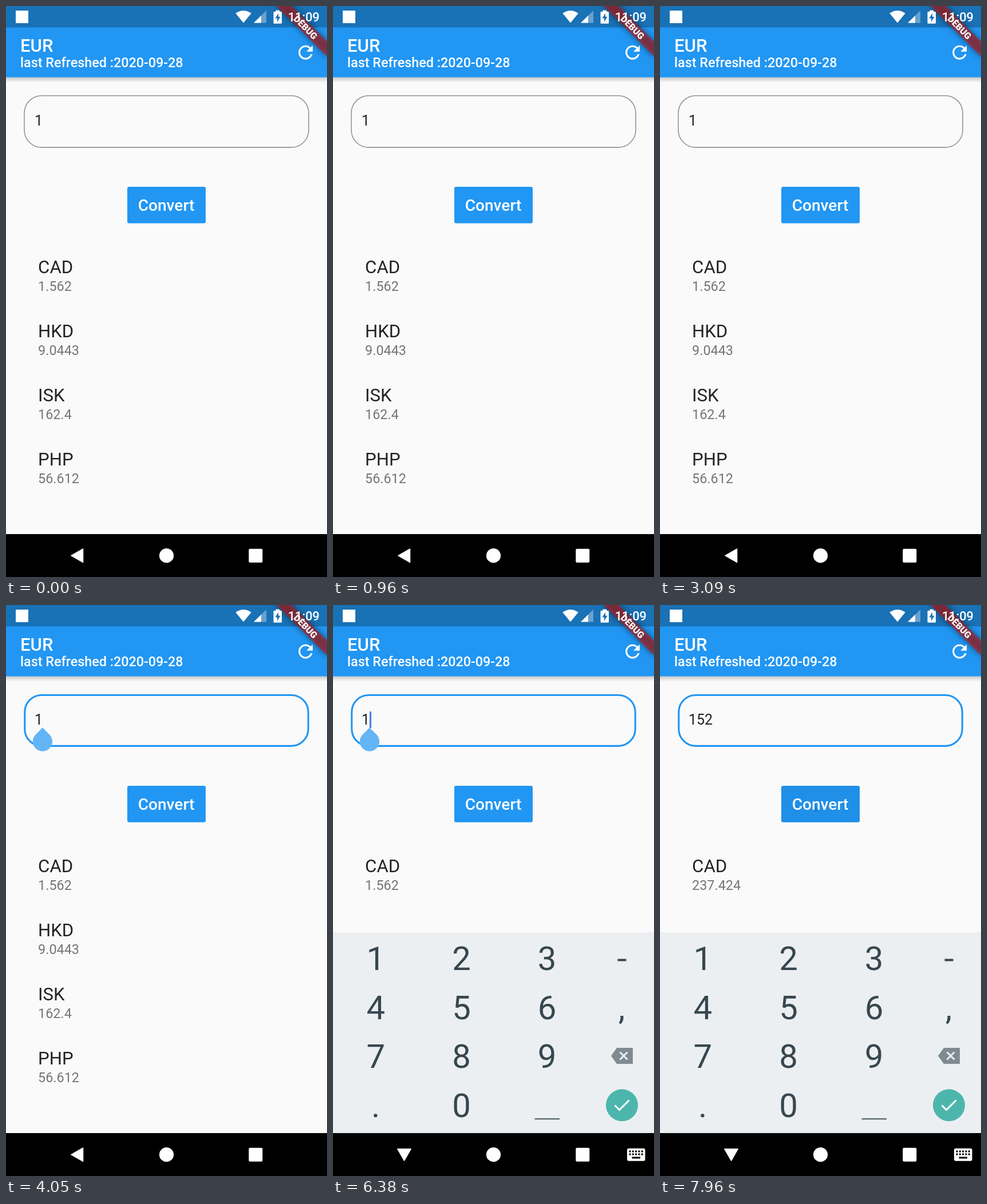
An HTML page with a canvas that plays this animation: 561 by 998 pixels, repeating every 8000 ms.

```html
<!DOCTYPE html>
<html lang="en">
<head>
<meta charset="utf-8">
<title>Currency converter</title>
<style>
  html, body { margin: 0; width: 100%; height: 100%; overflow: hidden; background: #fafafa; }
  canvas { display: block; width: 100vw; height: 100vh; }
</style>
</head>
<body>
<canvas id="stage"></canvas>
<script>
const W = 561, H = 998, LOOP = 8000;
const DP = W / 360;
const BLUE = '#2196f3';
const NAV_Y = 923, KEYS_Y = 575;

// Moments of the interaction, in ms
const FOCUS = 3130, KEYBOARD = 4300, TYPE_5 = 6700, TYPE_2 = 7050, PRESS = 7880, RESULT = 7940;

const RATES = [['CAD', '1.562'], ['HKD', '9.0443'], ['ISK', '162.4'], ['PHP', '56.612']];
const REFRESH = new Path2D('M17.65 6.35C16.2 4.9 14.21 4 12 4c-4.42 0-7.99 3.58-7.99 8s3.57 8 7.99 8c3.73 0 6.84-2.55 7.73-6h-2.08c-.82 2.33-3.04 4-5.65 4-3.31 0-6-2.69-6-6s2.69-6 6-6c1.66 0 3.14.69 4.22 1.78L13 11h7V4l-2.35 2.35z');

const canvas = document.getElementById('stage');
const ctx = canvas.getContext('2d');
const ratio = window.devicePixelRatio || 1;
canvas.width = Math.round(W * ratio);
canvas.height = Math.round(H * ratio);

const progress = (t, start, length) => Math.min(1, Math.max(0, (t - start) / length));
const easeOut = p => 1 - (1 - p) ** 3;

function rect(x, y, w, h, color) {
  ctx.fillStyle = color;
  ctx.fillRect(x, y, w, h);
}

function roundRect(x, y, w, h, r, color) {
  ctx.beginPath();
  ctx.roundRect(x, y, w, h, r);
  ctx.fillStyle = color;
  ctx.fill();
}

function circle(x, y, r, color) {
  ctx.beginPath();
  ctx.arc(x, y, r, 0, Math.PI * 2);
  ctx.fillStyle = color;
  ctx.fill();
}

function trace(points, closed) {
  ctx.beginPath();
  points.forEach(([x, y]) => ctx.lineTo(x, y));
  if (closed) ctx.closePath();
}

function polygon(points, color) {
  trace(points, true);
  ctx.fillStyle = color;
  ctx.fill();
}

function polyline(points, width, color) {
  trace(points, false);
  ctx.lineWidth = width;
  ctx.strokeStyle = color;
  ctx.stroke();
}

function text(str, x, y, size, color, weight = 400, align = 'left') {
  ctx.font = `${weight} ${size}px Roboto, sans-serif`;
  ctx.textAlign = align;
  ctx.fillStyle = color;
  ctx.fillText(str, x, y);
}

function fade(x, y, h, from, to) {
  const g = ctx.createLinearGradient(0, y, 0, y + h);
  g.addColorStop(0, `rgba(0,0,0,${from})`);
  g.addColorStop(1, `rgba(0,0,0,${to})`);
  rect(x, y, W, h, g);
}

function drawAppBar() {
  fade(0, 124.7, 9, 0.2, 0);
  rect(0, 0, W, 124.7, BLUE);
  rect(0, 0, W, 37.4, 'rgba(0,0,0,0.25)');
  text('EUR', 25, 79.5, 20 * DP, '#fff', 500);
  text('last Refreshed :2020-09-28', 25, 107, 15 * DP, '#fff', 500);
  ctx.save();
  ctx.translate(504.9, 62.5);
  ctx.scale(DP, DP);
  ctx.fillStyle = '#fff';
  ctx.fill(REFRESH);
  ctx.restore();
}

function drawBanner() {
  ctx.save();
  ctx.translate(W, 0);
  ctx.rotate(Math.PI / 4);
  const x = -40 * DP, y = 28 * DP, w = 80 * DP, h = 12 * DP;
  // Only the blurred shadow of an off-stage bar lands here
  ctx.save();
  ctx.shadowColor = 'rgba(0,0,0,0.5)';
  ctx.shadowBlur = 12 * ratio;
  const away = 2000;
  ctx.shadowOffsetX = away * Math.SQRT1_2 * ratio;
  ctx.shadowOffsetY = away * Math.SQRT1_2 * ratio;
  rect(x - away, y, w, h, '#000');
  ctx.restore();
  rect(x, y, w, h, 'rgba(183,28,28,0.627)');
  text('DEBUG', 0, y + h / 2 + 5.6, 10.2 * DP, '#fff', 900, 'center');
  ctx.restore();
}

function drawStatusIcons() {
  rect(17, 8, 22, 22, '#fff');

  ctx.beginPath();
  ctx.moveTo(415, 29.5);
  ctx.lineTo(401.3, 12.8);
  ctx.quadraticCurveTo(415, 3, 428.7, 12.8);
  ctx.closePath();
  ctx.fillStyle = '#fff';
  ctx.fill();

  polygon([[433, 29.5], [455, 29.5], [455, 8]], 'rgba(255,255,255,0.35)');
  polygon([[433, 29.5], [446, 29.5], [446, 16.8]], '#fff');

  rect(471.5, 7.5, 6.5, 4, '#fff');
  roundRect(467.5, 9.8, 14.5, 21, 1.5, '#fff');
  polygon([[476, 12.5], [470.5, 21.5], [474, 21.5], [474, 28], [479.5, 18.8], [476, 18.8]], '#1971b6');

  text('11:09', 548, 27, 14 * DP, '#fff', 500, 'right');
}

function drawField(t) {
  const focus = progress(t, FOCUS, 167);
  const line = DP * (1 + focus);
  const mix = (a, b) => Math.round(a + (b - a) * focus);
  ctx.beginPath();
  ctx.roundRect(31.2 + line / 2, 155.9 + line / 2, 498.6 - line, 92 - line, 20 * DP - line / 2);
  ctx.lineWidth = line;
  ctx.strokeStyle = `rgb(${mix(146, 33)},${mix(146, 150)},${mix(146, 243)})`;
  ctx.stroke();

  const value = t < TYPE_5 ? '1' : t < TYPE_2 ? '15' : '152';
  text(value, 49.9, 209, 16 * DP, '#212121');
  if (t < FOCUS) return;

  const blinkStart = t < TYPE_5 ? FOCUS : t < TYPE_2 ? TYPE_5 : TYPE_2;
  const caretX = 49.9 + ctx.measureText(value).width;
  if ((t - blinkStart) % 1000 < 500) roundRect(caretX, 186, 2 * DP, 29, 1, '#4285f4');
  if (t < TYPE_5) drawHandle(caretX);
}

function drawHandle(x) {
  const r = 11 * DP;
  ctx.beginPath();
  ctx.moveTo(x, 238.5 - r * Math.SQRT2);
  ctx.arc(x, 238.5, r, -Math.PI / 4, Math.PI * 1.25);
  ctx.closePath();
  ctx.fillStyle = '#64b5f6';
  ctx.fill();
}

function drawButton(t) {
  roundRect(212, 316, 137, 63.7, 3, BLUE);
  if (t >= PRESS) {
    const p = progress(t, PRESS, 200);
    ctx.save();
    ctx.beginPath();
    ctx.roundRect(212, 316, 137, 63.7, 3);
    ctx.clip();
    rect(212, 316, 137, 64, `rgba(0,0,0,${0.12 * p})`);
    circle(272, 358, 2 + 5 * p, 'rgba(0,0,0,0.1)');
    ctx.restore();
  }
  text('Convert', 280, 358, 18 * DP, '#fff', 500, 'center');
}

function drawRates(t) {
  const rows = t < KEYBOARD ? RATES : RATES.slice(0, 1);
  rows.forEach(([code, rate], i) => {
    const y = 466.8 + i * 72 * DP;
    text(code, 56.1, y, 20 * DP, '#212121');
    text(t < RESULT ? rate : '237.424', 56.1, y + 31, 15 * DP, '#757575');
  });
}

function drawKeyboard(t) {
  const p = easeOut(progress(t, KEYBOARD, 220));
  const ink = '#37474f';
  ctx.save();
  ctx.beginPath();
  ctx.rect(0, 0, W, NAV_Y);
  ctx.clip();
  ctx.translate(0, (1 - p) * (NAV_Y - KEYS_Y));

  fade(0, KEYS_Y - 4, 4, 0, 0.08);
  rect(0, KEYS_Y, W, NAV_Y - KEYS_Y, '#eceff1');
  const columns = [74.7, 224.5, 374];
  const rowY = i => 638 + i * 85.7;
  ['123', '456', '789', '.0'].forEach((row, r) => {
    [...row].forEach((key, c) => text(key, columns[c], rowY(r), 58, ink, 400, 'center'));
  });
  rect(352.5, 897, 43.5, 2.4, '#5f6c73');
  rect(497.5, 618.5, 15, 4, ink);
  text(',', 504.5, rowY(1), 58, ink, 400, 'center');

  polygon([[486, 788], [496, 774], [524, 774], [524, 802], [496, 802]], '#7f8b91');
  polyline([[501.5, 781.5], [514.5, 794.5]], 3, '#eceff1');
  polyline([[514.5, 781.5], [501.5, 794.5]], 3, '#eceff1');

  circle(505, 874.3, 28, '#4db6ac');
  polyline([[492.5, 874.5], [500.5, 882.5], [517.5, 865.5]], 3, '#fff');
  ctx.restore();
}

function drawNavBar(t) {
  const p = easeOut(progress(t, KEYBOARD, 220));
  rect(0, NAV_Y, W, H - NAV_Y, '#000');

  ctx.save();
  ctx.translate(124.5, 960.7);
  ctx.rotate(-p * Math.PI / 2);
  ctx.lineJoin = 'round';
  polygon([[-10.5, 0], [10, -11.7], [10, 11.7]], '#fff');
  ctx.lineWidth = 1.5;
  ctx.strokeStyle = '#fff';
  ctx.stroke();
  ctx.restore();

  circle(280.5, 960.7, 12.6, '#fff');
  roundRect(424.3, 948.7, 24, 24, 2, '#fff');
  if (t < KEYBOARD) return;

  roundRect(514, 949.7, 31.5, 22, 3, '#fff');
  for (let row = 0; row < 2; row++) {
    for (let col = 0; col < 5; col++) rect(517.5 + col * 5.3, 953.5 + row * 5, 3, 3, '#000');
  }
  rect(522.5, 964.5, 14.5, 3, '#000');
}

function draw(t) {
  ctx.setTransform(ratio, 0, 0, ratio, 0, 0);
  rect(0, 0, W, H, '#fafafa');
  drawAppBar();
  drawField(t);
  drawButton(t);
  drawRates(t);
  drawBanner();
  drawStatusIcons();
  if (t >= KEYBOARD) drawKeyboard(t);
  drawNavBar(t);
}

const start = performance.now();
function tick() {
  draw((performance.now() - start) % LOOP);
  requestAnimationFrame(tick);
}
tick();
</script>
</body>
</html>
```
